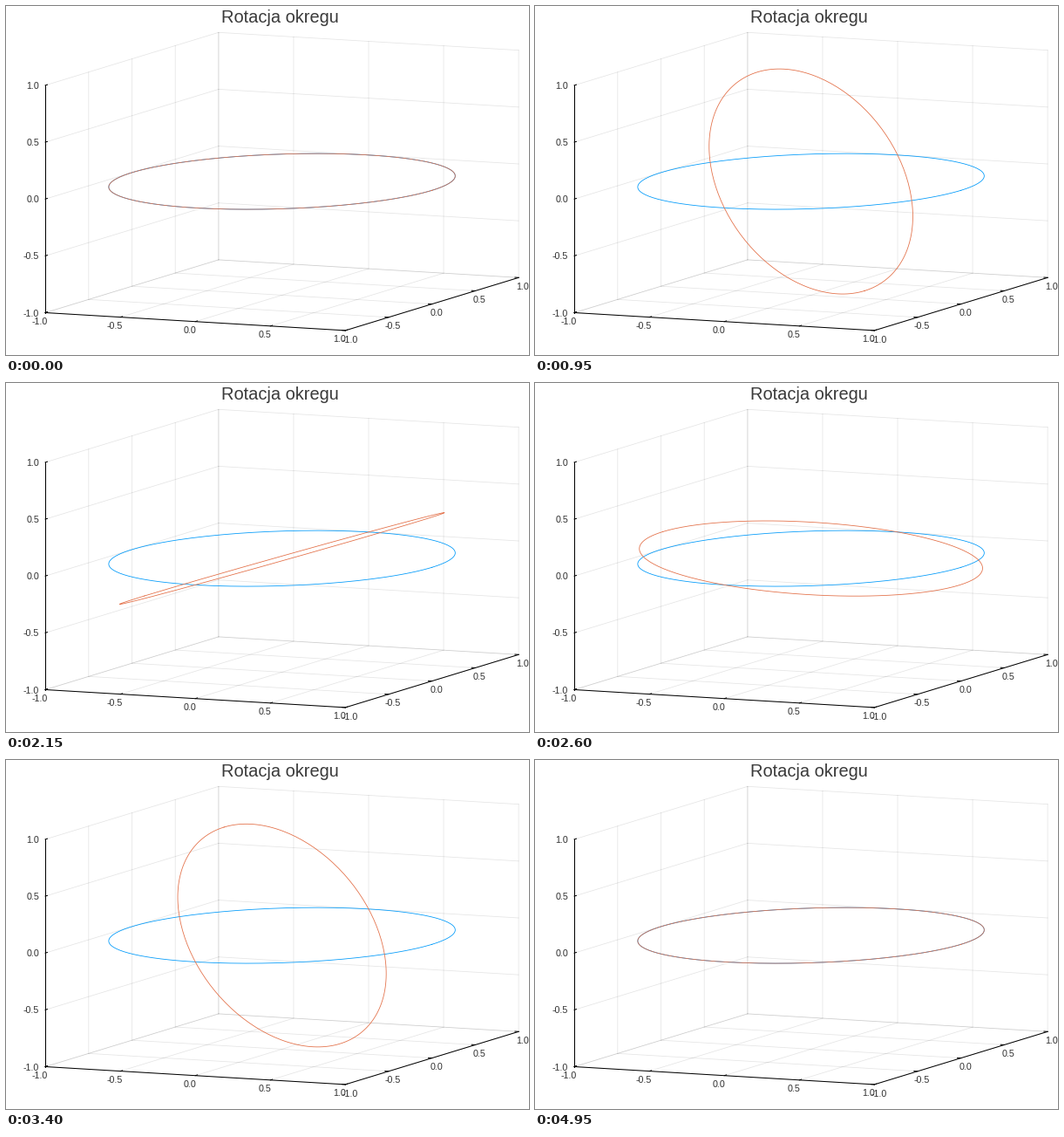
These frames come from a looping animation (600 px wide and 400 px high, 5 s). A matplotlib script:

```python
import numpy as np
import matplotlib.pyplot as plt
from matplotlib.animation import FuncAnimation

W, H, DPI = 600, 400, 100
FRAMES, INTERVAL = 100, 50
PX = 72 / DPI  # points per pixel
THIN = 0.8 * PX

# Parallel projection: screen position of the box centre and of the unit axes
CENTRE = np.array([316.6, 201.1])
AXES = np.array([[172.1, 10.2], [99.4, -30.3], [0, -130.3]])
TICKS = np.linspace(-1, 1, 5)
TICK_LEN = 0.024


def project(x, y, z):
    pts = np.stack(np.broadcast_arrays(x, y, z), axis=-1)
    return CENTRE + pts @ AXES


fig = plt.figure(figsize=(W / DPI, H / DPI), dpi=DPI, facecolor="white")
ax = fig.add_axes([0, 0, 1, 1])
ax.set_xlim(0, W)
ax.set_ylim(H, 0)
ax.axis("off")


def segment(a, b, lw=PX, **style):
    p, q = project(*a), project(*b)
    ax.plot([p[0], q[0]], [p[1], q[1]], color="black", lw=lw, **style)


def label(x, y, text, size=10.6, ha="center", color="#303030"):
    ax.text(x, y + 0.36 * size, text, fontsize=size * PX, ha=ha,
            va="baseline", color=color, family="Liberation Sans")


def grid_line(a, corner, b):
    for start, end in ((a, corner), (corner, b)):
        segment(start, end, lw=THIN, alpha=0.1, snap=False, zorder=1)


for t in TICKS:
    grid_line((t, -1, -1), (t, 1, -1), (t, 1, 1))
    grid_line((1, t, -1), (-1, t, -1), (-1, t, 1))
    grid_line((-1, -1, t), (-1, 1, t), (1, 1, t))

    segment((t, -1, -1), (t, -1 + TICK_LEN, -1), zorder=2)
    segment((1, t, -1), (1 - TICK_LEN, t, -1), zorder=2)
    segment((-1, -1, t), (-1, -1 + TICK_LEN, t), zorder=2)

    name = f"{t:.1f}"
    x, y = project(t, -1, -1)
    label(x - 6.7, y + 9.6, name)
    x, y = project(1, t, -1)
    label(x + 4.9, y + 9.8, name)
    x, y = project(-1, -1, t)
    label(38, y + 0.3, name, ha="right")

segment((-1, -1, -1), (1, -1, -1), zorder=2)
segment((1, -1, -1), (1, 1, -1), zorder=2)
segment((-1, -1, -1), (-1, -1, 1), zorder=2)
label(314.3, 12, "Rotacja okregu", size=20, color="#3a3a3a")

theta = np.linspace(0, 2 * np.pi, 201)


def circle(angle):
    """Unit circle turned about the y axis."""
    c, s = np.cos(theta), np.sin(theta)
    return project(c * np.cos(angle), s, -c * np.sin(angle)).T


ax.plot(*circle(0), color="#009afa", lw=THIN, zorder=3)
turning, = ax.plot(*circle(0), color="#e36f47", lw=THIN, zorder=4)


def update(i):
    turning.set_data(*circle(2 * np.pi * i / (FRAMES - 1)))
    return turning,


anim = FuncAnimation(fig, update, frames=FRAMES, interval=INTERVAL,
                     repeat=True, repeat_delay=0)
plt.show()
```
